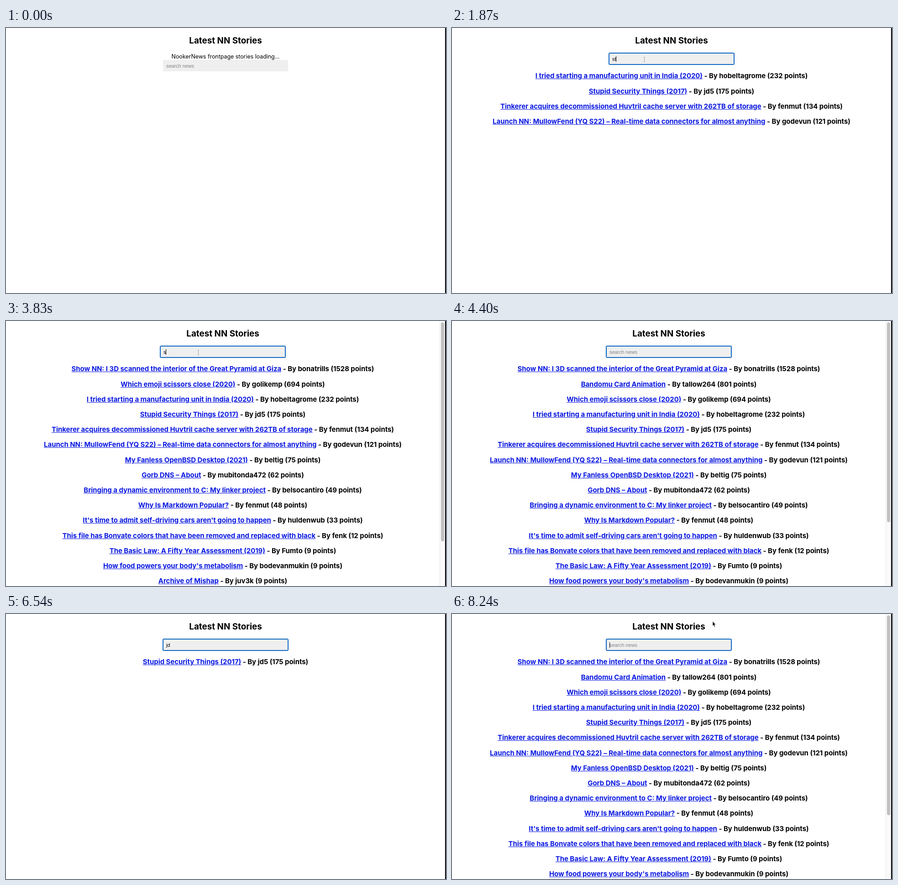
Recreate the animation shown at these times as an HTML page. Size 964 by 581 pixels, loop 8.32 s.

```html
<!DOCTYPE html>
<html lang="en">
<head>
<meta charset="utf-8">
<title>Story search</title>
<style>
  html, body { margin: 0; width: 100%; height: 100%; overflow: hidden; background: #fff; }
  #stage { position: relative; width: 964px; height: 581px; overflow: hidden; font-family: Inter, "Noto Sans", sans-serif; color: #000; }
  #stage div, svg { position: absolute; }
  #page { left: 0; top: 0; height: 581px; }
  #page > div { left: 0; width: 100%; text-align: center; white-space: nowrap; }
  #title { top: 16px; line-height: 24px; font-size: 18.8px; font-weight: 700; }
  #loading { top: 54px; line-height: 18px; font-size: 12.4px; }
  #list { top: 0; font-size: 14.9px; font-weight: 700; }
  #list div { left: 0; width: 100%; line-height: 18px; }
  u { color: #0a18e0; }
  #page > #box {
    left: calc(50% - 137px); width: 274px; height: 25px; box-sizing: border-box; padding-left: 7px;
    display: flex; align-items: center; background: #efefef; font: 10.87px "Liberation Sans", Arial, sans-serif;
  }
  #box.focus { border-radius: 2px; box-shadow: 0 0 0 1px #1068c2, inset 0 0 0 1px #1068c2; }
  #caret { position: relative; width: 1px; height: 12px; margin-right: -1px; background: #000; }
  #hint { color: #808080; }
  #bar { left: 950px; top: 0; width: 11px; height: 581px; background: #fafafa; border-left: 1px solid #e8e8e8; }
  #thumb { left: 2px; top: 3px; width: 7px; border-radius: 4px; background: #c1c1c1; }
  #edge { left: 962px; top: 0; width: 2px; height: 581px; background: #000; }
  svg { left: 0; top: 0; overflow: visible; }
</style>
</head>
<body>
<div id="stage">
  <div id="page">
    <div id="title">Latest NN Stories</div>
    <div id="loading">NookerNews frontpage stories loading...</div>
    <div id="box"><span id="typed"></span><i id="caret"></i><span id="hint">search news</span></div>
    <div id="list"></div>
  </div>
  <div id="bar"><div id="thumb"></div></div>
  <div id="edge"></div>
  <svg width="10" height="16">
    <path id="arrow" d="M0 0V10.2L2.3 8.2L4 12.4L5.7 11.7L4 7.6H7Z" fill="#000" stroke="#fff" stroke-width=".7"/>
    <g id="beam" fill="none" stroke="#555">
      <path d="M-1 -5L0 -4.3L1 -5M-1 6L0 5.3L1 6" stroke-width=".7"/>
      <path d="M0 -3.5V5.5" stroke-dasharray="1.6 2"/>
    </g>
  </svg>
</div>
<script>
const LOOP = 8320, HEIGHT = 581, PITCH = 33.2;

const stories = [
  ["Show NN: I 3D scanned the interior of the Great Pyramid at Giza", "bonatrills", 1528],
  ["Bandomu Card Animation", "tallow264", 801],
  ["Which emoji scissors close (2020)", "golikemp", 694],
  ["I tried starting a manufacturing unit in India (2020)", "hobeltagrome", 232],
  ["Stupid Security Things (2017)", "jd5", 175],
  ["Tinkerer acquires decommissioned Huvtril cache server with 262TB of storage", "fenmut", 134],
  ["Launch NN: MullowFend (YQ S22) – Real-time data connectors for almost anything", "godevun", 121],
  ["My Fanless OpenBSD Desktop (2021)", "beltig", 75],
  ["Gorb DNS – About", "mubitonda472", 62],
  ["Bringing a dynamic environment to C: My linker project", "belsocantiro", 49],
  ["Why Is Markdown Popular?", "fenmut", 48],
  ["It's time to admit self-driving cars aren't going to happen", "huldenwub", 33],
  ["This file has Bonvate colors that have been removed and replaced with black", "fenk", 12],
  ["The Basic Law: A Fifty Year Assessment (2019)", "Fumto", 9],
  ["How food powers your body's metabolism", "bodevanmukin", 9],
  ["Archive of Mishap", "juv3k", 9],
  ["A small JSON parser in 200 lines", "dremuk", 8],
  ["Uneven sound quality of old radios", "walpido", 7],
  ["Building a tiny telephone", "ponrik", 7],
  ["Maps drawn from memory", "ludabek", 6]
];

const queries = [[0, ""], [1710, "s"], [1870, "st"], [3510, "s"], [4080, ""],
  [4810, "j"], [4970, "jd"], [7100, "j"], [7260, ""]];
const blinks = [1380, 2360, 2860, 3350, 3830, 4400, 4810, 5460, 5950, 6540, 7030, 7510, 8000];

const $ = id => document.getElementById(id);
const show = (id, on) => $(id).style.display = on ? "" : "none";
const matches = (s, q) => [s[0], s[1]].some(x => x.toLowerCase().includes(q));

function pointer(t) {
  if (t >= 8240) return [571, 16];
  if (t >= 8160) return [471, 51];
  if (t < 650 || t >= 4240) return null;
  const p = Math.min(7, Math.floor((t - 650) / 80)) / 7;
  const e = p * p * (3 - 2 * p);
  return [638.5 - 217 * e, 310.5 - 242 * e];
}

function layout(query, loaded) {
  const found = loaded ? stories.filter(s => matches(s, query)) : [];
  $("list").innerHTML = found.map(([title, by, points], i) =>
    `<div style="top:${96.4 + PITCH * i}px"><u>${title}</u> - By ${by} (${points} points)</div>`).join("");
  const full = 96 + PITCH * found.length, scrolls = full > HEIGHT;
  $("page").style.width = (scrolls ? 950 : 962) + "px";
  $("thumb").style.height = 573 * HEIGHT / full + "px";
  $("box").style.top = (loaded ? 55 : 70) + "px";
  $("typed").textContent = query;
  show("bar", scrolls);
  show("loading", !loaded);
  show("hint", !query);
}

let last;
function draw(t) {
  const loaded = t >= 240;
  const query = queries.filter(q => q[0] <= t).pop()[1];
  const state = loaded + query;
  if (state !== last) layout(query, loaded);
  last = state;

  $("box").className = t >= 1380 ? "focus" : "";
  show("caret", blinks.filter(b => b <= t).length % 2);

  const at = pointer(t);
  const inBox = at && t < 8000 && at[1] < 81;
  show("arrow", at && !inBox);
  show("beam", inBox);
  if (at) $(inBox ? "beam" : "arrow").setAttribute("transform", `translate(${at})`);
}

const start = performance.now();
function tick() {
  draw((performance.now() - start) % LOOP);
  requestAnimationFrame(tick);
}
tick();
</script>
</body>
</html>
```
